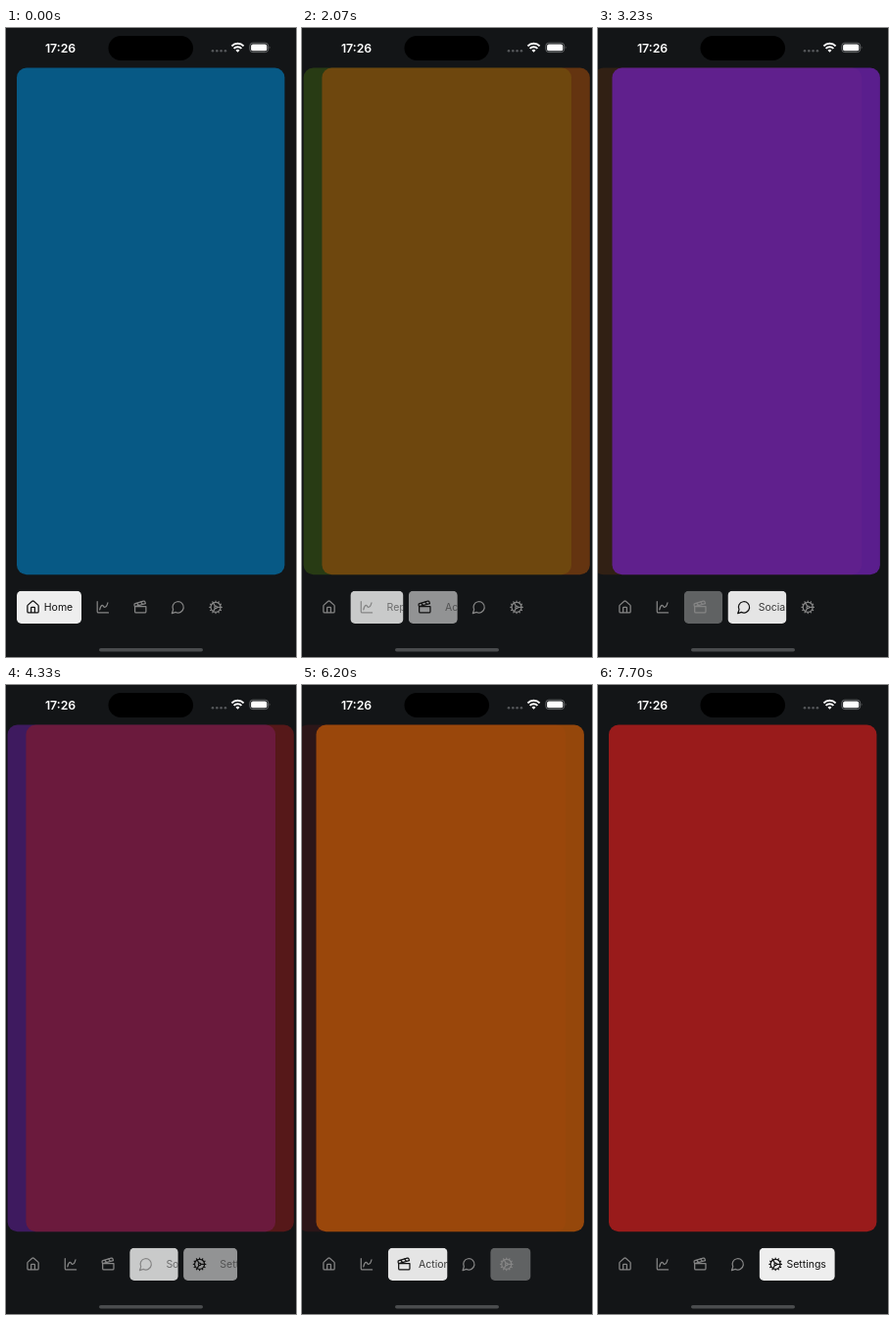
Write an HTML page that moves like this. It is 296 px wide and 640 px high and loops after 8 s.

```html
<!DOCTYPE html>
<html lang="en">
<head>
<meta charset="utf-8">
<title>Tab bar</title>
<style>
  html, body { margin: 0; width: 100%; height: 100%; overflow: hidden; background: #131517; }
  svg { display: block; }
  #stage { width: 100vw; height: 100vh; }
  text { font-family: Inter, Roboto, sans-serif; }
  .label { font-size: 10.5px; fill: #111; }
  .icon { fill: none; stroke-width: 2; stroke-linecap: round; stroke-linejoin: round; }
</style>
</head>
<body>
<svg id="stage" viewBox="0 0 296 640">
  <rect width="296" height="640" fill="#131517"/>
  <g id="panels"></g>
  <g id="tabs"></g>

  <text x="55.6" y="24.5" font-size="12.3" font-weight="600" fill="#fff" text-anchor="middle">17:26</text>
  <rect x="104.5" y="8" width="86.5" height="25" rx="12.5" fill="#000"/>
  <g fill="#55575a">
    <circle cx="211" cy="23.2" r="1.3"/><circle cx="215.3" cy="23.2" r="1.3"/>
    <circle cx="219.6" cy="23.2" r="1.3"/><circle cx="223.9" cy="23.2" r="1.3"/>
  </g>
  <g fill="none" stroke="#fff" stroke-width="1.9">
    <path d="M230.4 18.3a8.6 8.6 0 0 1 12.2 0"/>
    <path d="M232.6 20.8a5.5 5.5 0 0 1 7.8 0"/>
  </g>
  <path d="M234.5 22.7a2.9 2.9 0 0 1 4 0l-2 2.1z" fill="#fff"/>
  <rect x="248.8" y="15.2" width="18.8" height="9.4" rx="3" fill="none" stroke="#77797b" stroke-width=".8"/>
  <rect x="250.1" y="16.5" width="16.2" height="6.8" rx="1.9" fill="#fff"/>
  <path d="M268.8 18.3q1.3 1.6 0 3.2z" fill="#77797b"/>
  <rect x="95" y="631" width="106" height="3.6" rx="1.8" fill="#4a4c4e"/>
</svg>
<script>
const LOOP = 8000, STEP = 110;
const LEFT = 11, SIZE = 33.1, GAP = 5.3, SHIFT = 18.8;

const TABS = [
  { name: 'Home', color: '#075985', width: 66, icon:
    'M15 21v-8a1 1 0 0 0-1-1h-4a1 1 0 0 0-1 1v8' +
    'M3 10a2 2 0 0 1 .71-1.53l7-6a2 2 0 0 1 2.58 0l7 6A2 2 0 0 1 21 10v9a2 2 0 0 1-2 2H5a2 2 0 0 1-2-2z' },
  { name: 'Reports', color: '#3f6212', width: 75, icon:
    'M3 3v16a2 2 0 0 0 2 2h16M7 16c.5-2 1.5-7 4-7 2 0 2 3 4 3 2.5 0 4.5-5 5-7' },
  { name: 'Action', color: '#b45309', width: 67, icon:
    'M20.2 6 3 11l-.9-2.4c-.3-1.1.3-2.2 1.3-2.5l13.5-4c1.1-.3 2.2.3 2.5 1.3Z' +
    'M6.2 5.3l3.1 3.9M12.4 3.4l3.1 4M3 11h18v8a2 2 0 0 1-2 2H5a2 2 0 0 1-2-2Z' },
  { name: 'Social', color: '#6b21a8', width: 66, icon: 'M7.9 20A9 9 0 1 0 4 16.1L2 22Z' },
  { name: 'Settings', color: '#991b1b', width: 77.2, icon:
    'M12 20a8 8 0 1 0 0-16 8 8 0 0 0 0 16ZM12 14a2 2 0 1 0 0-4 2 2 0 0 0 0 4Z' +
    'M12 2v2M12 22v-2M17 20.66l-1-1.73M11 10.27 7 3.34M20.66 17l-1.73-1M3.34 7l1.73 1' +
    'M14 12h8M2 12h2M20.66 7l-1.73 1M3.34 17l1.73-1M17 3.34l-1 1.73M11 13.73l-4 6.93' }
];

// lead: how far the spring has already run when the change first shows
const SWITCHES = [
  { at: 500, lead: 20, tab: 1 },
  { at: 2070, lead: 130, tab: 2 },
  { at: 3010, lead: 20, tab: 3 },
  { at: 4330, lead: 130, tab: 4 },
  { at: 5980, lead: 20, tab: 2 },
  { at: 6930, lead: 20, tab: 4 }
];

function make(tag, attrs, parent) {
  const el = document.createElementNS('http://www.w3.org/2000/svg', tag);
  set(el, attrs);
  parent.append(el);
  return el;
}

function set(el, attrs) {
  for (const key in attrs) el.setAttribute(key, attrs[key]);
}

const panels = document.getElementById('panels');
const panelBox = { y: 40.5, width: 273.4, height: 515.8, rx: 10 };
const leaving = make('rect', panelBox, panels);
const entering = make('rect', panelBox, panels);

const views = TABS.map(tab => {
  const box = make('svg', { y: 572.8, height: SIZE, overflow: 'hidden' }, document.getElementById('tabs'));
  const pill = make('rect', { width: '100%', height: '100%', rx: 4.6, fill: '#eee' }, box);
  const icon = make('path', { class: 'icon', d: tab.icon, transform: 'translate(9 9) scale(.6275)' }, box);
  const label = make('text', { class: 'label', y: 20.3 }, box);
  label.textContent = tab.name;
  return { box, pill, icon, label };
});

const spring = ms => {
  const x = Math.max(0, ms) * 0.0129;
  return 1 - (1 + x) * Math.exp(-x);
};

const easeInOut = x => {
  x = Math.min(1, Math.max(0, x));
  return x < 0.5 ? 2 * x * x : 1 - 2 * (1 - x) ** 2;
};

function stateAt(time) {
  let from = -1, to = 0, age = LOOP;
  for (const s of SWITCHES) {
    if (time < s.at) break;
    from = to;
    to = s.tab;
    age = s.lead + STEP * Math.floor((time - s.at) / STEP);
  }
  return { from, to, age };
}

function draw(time) {
  const { from, to, age } = stateAt(time);
  const p = spring(age);

  set(entering, { x: LEFT + SHIFT * (1 - p), fill: TABS[to].color, opacity: p });
  set(leaving, {
    x: LEFT - SHIFT * p,
    fill: from < 0 ? 'none' : TABS[from].color,
    opacity: 1 - p
  });

  let x = LEFT;
  views.forEach((view, i) => {
    const active = i === to;
    const open = active ? p : i === from ? 1 - p : 0;
    const shade = active ? easeInOut((age + 60) / 350)
      : i === from ? 1 - easeInOut((age - 20) / 380) : 0;
    const width = SIZE + (TABS[i].width - SIZE) * open;
    set(view.box, { x, width });
    set(view.pill, { opacity: shade });
    set(view.icon, { stroke: active ? '#111' : '#858585' });
    set(view.label, { x: 27.8 + SHIFT * (1 - open), opacity: open });
    x += width + GAP;
  });
}

function tick() {
  draw(performance.now() % LOOP);
  requestAnimationFrame(tick);
}
tick();
</script>
</body>
</html>
```
